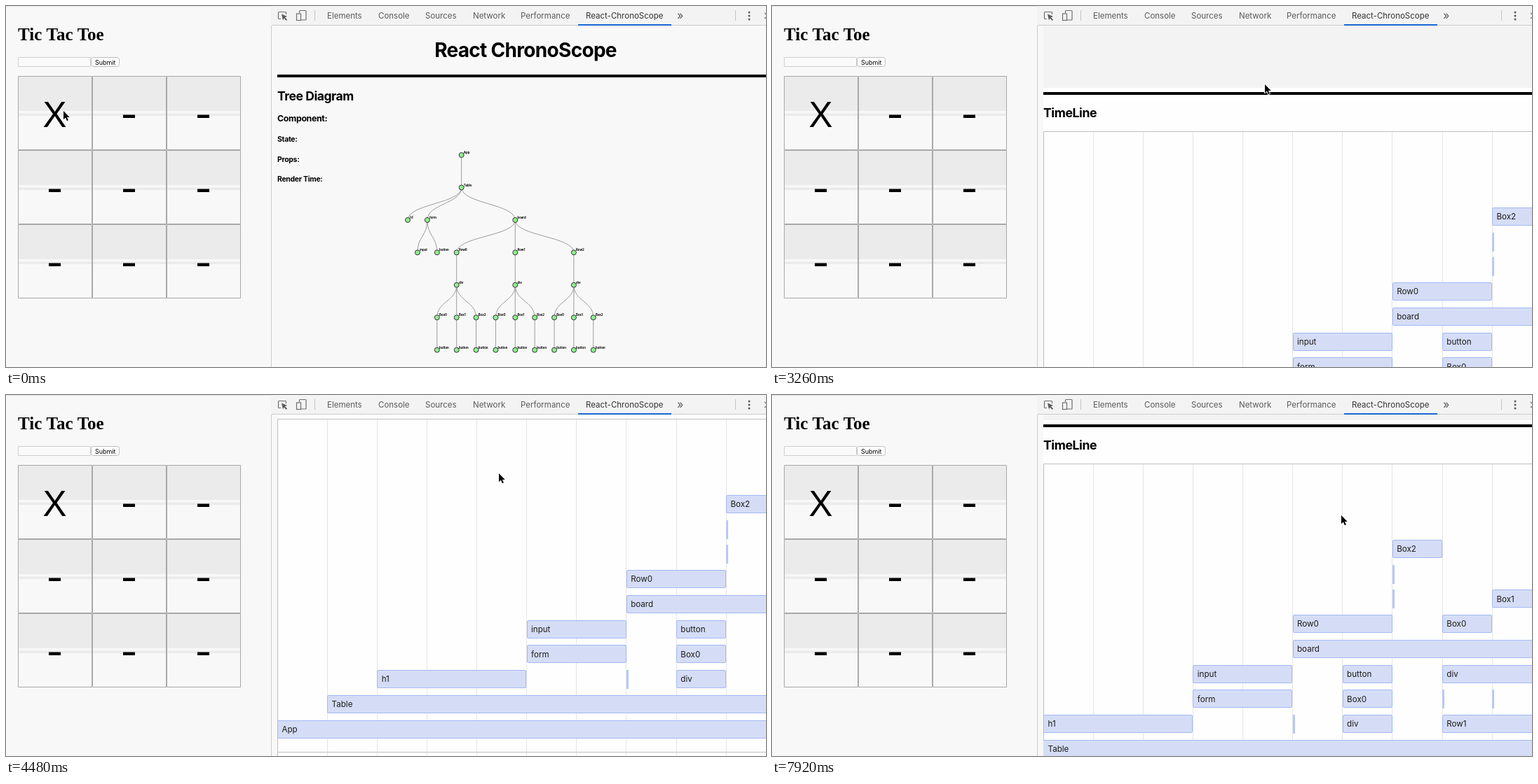
Animation, 1084 px wide and 516 px high, one loop 8000 ms. Source, as an HTML page with a canvas:

```html
<!DOCTYPE html>
<html lang="en">
<head>
<meta charset="utf-8">
<title>Tic Tac Toe</title>
<style>
html, body { margin: 0; width: 100%; height: 100%; overflow: hidden; background: #f8f8f8; }
canvas { display: block; }
</style>
</head>
<body>
<canvas id="stage" width="1084" height="516"></canvas>
<script>
const LOOP = 8000, W = 1084, H = 516, LEFT = 387;
const ctx = document.getElementById('stage').getContext('2d');
const SANS = 'Inter, sans-serif';

const lerp = (a, b, p) => a + (b - a) * p;
const smooth = p => p * p * (3 - 2 * p);

// Progress from start to end in n discrete steps; the first one lands on start.
function steps(t, start, end, n) {
  if (t < start) return 0;
  const i = Math.floor((t - start) / (end - start) * (n - 1) + 0.15);
  return Math.min(1, (i + 1) / n);
}

function rect(x, y, w, h, color) {
  ctx.fillStyle = color;
  ctx.fillRect(x, y, w, h);
}

function box(x, y, w, h, r, fill, stroke) {
  ctx.beginPath();
  ctx.roundRect(x, y, w, h, r);
  if (fill) { ctx.fillStyle = fill; ctx.fill(); }
  ctx.strokeStyle = stroke;
  ctx.lineWidth = 1;
  ctx.stroke();
}

function text(str, x, y, font, color = '#000', align = 'left', spacing = '0px') {
  ctx.font = font;
  ctx.fillStyle = color;
  ctx.textAlign = align;
  ctx.letterSpacing = spacing;
  ctx.fillText(str, x, y);
}

const heading = (str, x, y, size, align) =>
  text(str, x, y, `bold ${size}px ${SANS}`, '#000', align, `${-0.025 * size}px`);

// ---- Game on the left ----

function drawGame() {
  rect(0, 0, 378, H, '#f8f8f8');
  rect(0, 0, 378, 1, '#e2e2e2');
  text('Tic Tac Toe', 17, 49, 'bold 25px "Liberation Serif", serif');
  box(17.5, 73.5, 103, 13, 0, '#fafafa', '#cfcfcf');
  box(121.5, 73.5, 40, 13, 3, '#fff', '#bdbdbd');
  text('Submit', 141.7, 83.5, `9px ${SANS}`, '#000', 'center');
  for (let row = 0; row < 3; row++) {
    for (let col = 0; col < 3; col++) {
      const x = 17 + col * 106, y = 100 + row * 106;
      rect(x, y, 106, 106, '#f8f8f8');
      rect(x, y, 106, 50, '#ebebeb');
      rect(x, y + 53.5, 106, 3.5, '#ebebeb');
      box(x + 0.5, y + 0.5, 105, 105, 0, null, '#a9a9a9');
      if (row || col) rect(x + 44, y + 55.5, 17, 4.5, '#000');
      else text('X', x + 52.5, y + 73, '51px "Liberation Sans", sans-serif', '#000', 'center');
    }
  }
}

// ---- Toolbar ----

function drawIcons() {
  ctx.strokeStyle = '#6e6e6e';
  ctx.lineWidth = 1.2;
  ctx.stroke(new Path2D('M392 18.5H389.5Q388.5 18.5 388.5 17.5V9.5Q388.5 8.5 389.5 8.5H398.5Q399.5 8.5 399.5 9.5V12'));
  ctx.stroke(new Path2D('M418.5 10V7.5Q418.5 6.5 419.5 6.5H427Q428 6.5 428 7.5V19Q428 20 427 20H421'));
  ctx.strokeRect(414.5, 11, 6, 9.5);
  ctx.fillStyle = '#5a5a5a';
  ctx.fill(new Path2D('M393 11.5L401 15L397.8 16.2L401 19.6L399.7 20.9L396.4 17.5L395 20.5Z'));
  for (const y of [9, 14, 19]) {
    ctx.beginPath();
    ctx.arc(1060, y, 1.5, 0, 7);
    ctx.fill();
  }
  ctx.stroke(new Path2D('M1082 10L1090 18M1082 18L1090 10'));
}

function drawToolbar() {
  rect(378, 0, W - 378, 28, '#f3f3f3');
  rect(379, 27, W - 379, 1, '#cccccc');
  rect(440, 6, 1, 15, '#c4c4c4');
  rect(1040, 6, 1, 15, '#c4c4c4');
  const tabs = [['Elements', 458], ['Console', 531], ['Sources', 598], ['Network', 666], ['Performance', 734]];
  for (const [name, x] of tabs) text(name, x, 17.5, `11.5px ${SANS}`, '#5a5a5a');
  text('React-ChronoScope', 827, 17.5, `11.5px ${SANS}`, '#333');
  text('»', 957, 18.5, `16px ${SANS}`, '#5a5a5a');
  rect(816, 26, 133, 2, '#1a67d2');
  drawIcons();
}

// ---- Component tree ----

const GREEN = [144, 238, 144], RED = [240, 65, 35], GREY = [120, 120, 120];
const nodes = [];

function node(name, col, level, parent, after = GREEN) {
  const n = { name, x: 573 + 27.87 * col, y: 213 + 46.45 * level, parent, after };
  nodes.push(n);
  return n;
}

const app = node('App', 2.75, 0, null, GREY);
const table = node('Table', 2.75, 1, app);
node('h1', 0, 2, table);
const form = node('form', 1, 2, table);
node('input', 0.5, 3, form);
node('button', 1.5, 3, form);
const board = node('board', 5.5, 2, table);
for (let r = 0; r < 3; r++) {
  const mid = 2.5 + 3 * r, rowEnd = r ? RED : GREEN;
  const row = node('Row' + r, mid, 3, board, rowEnd);
  const div = node('div', mid, 4, row, rowEnd);
  for (let b = 0; b < 3; b++) {
    const end = r || b ? RED : GREEN;
    const cell = node('Box' + b, mid - 1 + b, 5, div, end);
    node('button', mid - 1 + b, 6, cell, end);
  }
}

function drawTree(p) {
  ctx.strokeStyle = '#9a9a9a';
  ctx.lineWidth = 1;
  for (const { x, y, parent: a } of nodes) {
    if (!a) continue;
    const my = (a.y + y) / 2;
    ctx.beginPath();
    ctx.moveTo(a.x, a.y);
    ctx.bezierCurveTo(a.x, my, x, my, x, y);
    ctx.stroke();
  }
  for (const n of nodes) {
    const rgb = GREEN.map((c, i) => Math.round(lerp(c, n.after[i], p)));
    ctx.beginPath();
    ctx.arc(n.x, n.y, n.after === RED ? lerp(3.5, 4.2, p) : 3.5, 0, 7);
    ctx.fillStyle = `rgb(${rgb})`;
    ctx.fill();
    ctx.strokeStyle = '#333';
    ctx.stroke();
    text(n.name, n.x + 3.2, n.y - 1.9, `bold 4.3px ${SANS}`);
  }
}

// ---- Timeline ----

const COL = 71.1, LONG = 30;
// name, start column, length in columns, level from the bottom
const items = [
  ['App', 0, LONG, 0], ['Table', 1, LONG, 1], ['h1', 2, 3, 2],
  ['form', 5, 2, 3], ['input', 5, 2, 4], ['', 7, 0, 2],
  ['board', 7, LONG, 5], ['Row0', 7, 2, 6], ['div', 8, 1, 2],
  ['Box0', 8, 1, 3], ['button', 8, 1, 4], ['', 9, 0, 7],
  ['', 9, 0, 8], ['Box2', 9, 1, 9], ['Row1', 10, LONG, 2],
  ['', 10, 0, 3], ['div', 10, LONG, 4], ['Box0', 10, 1, 6],
  ['', 11, 0, 3], ['Box1', 11, 1, 7]
];

function drawTimeline(top, shift) {
  rect(LEFT, top, W, 478, '#fefefe');
  for (let i = 1; i < 10; i++) rect(Math.round(LEFT + i * COL - 0.3), top, 1, 500, '#e5e5e5');
  rect(LEFT, top, W, 1, '#bfbfbf');
  rect(LEFT, top + 476, W, 1, '#bfbfbf');
  rect(LEFT, top, 1, 500, '#bfbfbf');
  for (const [name, start, len, level] of items) {
    const x = LEFT + (start - shift) * COL, mid = top + 443.5 - 35.75 * level;
    if (x > W || x + len * COL < LEFT) continue;
    if (!len) {
      rect(Math.round(x), Math.round(mid - 13), 3, 27, '#b9c8f7');
      continue;
    }
    box(Math.round(x) + 0.5, Math.round(mid - 13) + 0.5, Math.round(len * COL) - 1, 25, 1.5, '#d5ddf6', '#a3b8f5');
    text(name, Math.max(x, LEFT) + 6.5, mid + 4.3, `11.6px ${SANS}`, '#1a1a1a');
  }
}

// ---- Scrolling page on the right ----

const RULE2 = 660;

function scrollAt(t) {
  const start = 1 - Math.pow(1 - Math.pow(steps(t, 2620, 3340, 11), 2.8), 3);
  const out = p => 1 - Math.pow(1 - p, 1.4);
  return Math.round(544 * start
    + 69 * smooth(steps(t, 3430, 3750, 6))
    + 69 * out(steps(t, 4080, 4480, 6))
    - 64 * smooth(steps(t, 7720, 7920, 4)));
}

function drawPage(t) {
  const scroll = scrollAt(t), shift = (t >= 6000) + (t >= 6850);
  rect(378, 28, W, H, '#f8f8f8');
  ctx.save();
  ctx.beginPath();
  ctx.rect(LEFT, 28, W - LEFT, H - 28);
  ctx.clip();
  if (t >= 2620) rect(LEFT, 28, W, H, '#fefefe');
  ctx.translate(0, -scroll);
  if (t >= 2620) rect(LEFT, 154, W, RULE2 - 160, '#f3f3f3');
  heading('React ChronoScope', 741, 73, 28, 'center');
  rect(LEFT, 98, W, 4, '#000');
  heading('Tree Diagram', LEFT, 134.5, 17.5);
  heading('Component:', LEFT, 165.3, 12.3);
  heading('State:', LEFT, 194, 10.4);
  heading('Props:', LEFT, 222.6, 10.4);
  heading('Render Time:', LEFT, 251.2, 10.4);
  drawTree(steps(t, 240, 720, 8));
  rect(LEFT, RULE2, W, 4, '#000');
  heading('TimeLine', LEFT, RULE2 + 36, 17.7);
  drawTimeline(RULE2 + 56, shift);
  ctx.restore();
  rect(378, 0, 1, H, '#cccccc');
}

// ---- Pointer ----

// start, end, steps, x, y
const moves = [
  [1670, 1900, 5, 703, 112], [4840, 4980, 3, 952, 148], [5220, 5500, 6, 1008, 166],
  [5740, 6310, 10, 864, 168], [6540, 7130, 11, 813, 174], [7310, 7310.1, 1, 812, 172]
];

function pointerAt(t) {
  const p = smooth(steps(t, 1020, 1430, 8)), q = 1 - p;
  const bez = (a, b, c, d) => q * q * q * a + 3 * q * q * p * b + 3 * q * p * p * c + p * p * p * d;
  let x = bez(82, 280, 500, 708), y = bez(150, 50, 0, 86);
  for (const [start, end, n, tx, ty] of moves) {
    const k = smooth(steps(t, start, end, n));
    x = lerp(x, tx, k);
    y = lerp(y, ty, k);
  }
  return [x, y];
}

const arrow = new Path2D('M0 0V12.2L2.9 9.6L4.9 14.2L6.9 13.3L4.9 8.9H8.7Z');
const cross = new Path2D('M0-6L2.4-3.2H.8V-.8H3.2V-2.4L6 0L3.2 2.4V.8H.8V3.2H2.4L0 6L-2.4 3.2H-.8V.8H-3.2V2.4L-6 0L-3.2-2.4V-.8H-.8V-3.2H-2.4Z');

function drawPointer(t) {
  const shape = t >= 5740 && t < 7310 ? cross : arrow;
  ctx.save();
  ctx.translate(...pointerAt(t));
  ctx.lineJoin = 'round';
  ctx.strokeStyle = '#fff';
  ctx.lineWidth = 1.8;
  ctx.stroke(shape);
  ctx.fillStyle = '#000';
  ctx.fill(shape);
  ctx.restore();
}

const begin = performance.now();

function draw() {
  const t = (performance.now() - begin) % LOOP;
  drawGame();
  drawPage(t);
  drawToolbar();
  drawPointer(t);
  requestAnimationFrame(draw);
}
draw();
</script>
</body>
</html>
```
